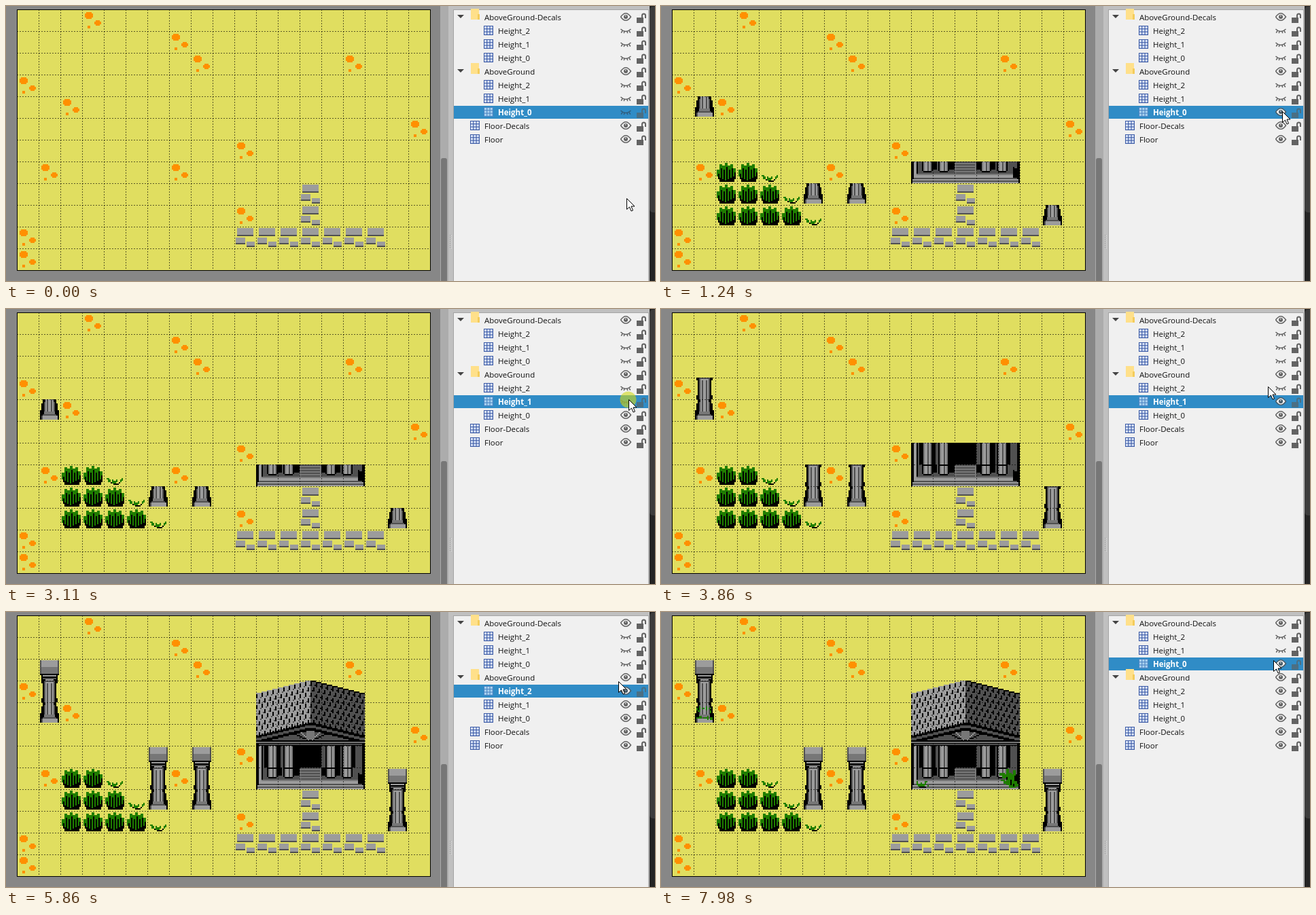
These frames come from a looping animation (955 px wide and 405 px high, 8 s). An HTML page with a canvas:

```html
<!DOCTYPE html>
<html lang="en">
<head>
<meta charset="utf-8">
<title>Layer heights</title>
<style>
html, body { margin: 0; height: 100%; overflow: hidden; background: #878787; }
canvas { display: block; }
</style>
</head>
<body>
<canvas id="stage" width="955" height="405"></canvas>
<script>
const ctx = document.getElementById('stage').getContext('2d');
const LOOP = 8000, STEP = 125;
const K = '#000', D = '#505050', M = '#777', G = '#9c9c9c', LEAF = '#1f7d00';

function box(color, x, y, w, h) {
  ctx.fillStyle = color;
  ctx.fillRect(x, y, w, h);
}

function shape(color, points) {
  ctx.fillStyle = color;
  ctx.beginPath();
  points.forEach(([x, y]) => ctx.lineTo(x, y));
  ctx.closePath();
  ctx.fill();
}

// Art pixels are 2 x 2; the origin is a tile's column and row.
function art(col, row, parts) {
  const ox = 16 + col * 32, oy = 5 + row * 32;
  for (const [c, x, y, w, h] of parts) box(c, ox + x * 2, oy + y * 2, w * 2, h * 2);
}

// ---- map tiles ----
const flowers = [[3,0],[7,1],[8,2],[15,2],[0,3],[2,4],[18,5],[10,6],[1,7],[7,7],[10,9],[0,10],[0,11]];
const paving = [[13,8],[13,9]];
for (let c = 10; c < 17; c++) paving.push([c, 10]);
const pillars = [[1,4],[6,8],[8,8],[17,9]];

const O = '#ff9000';
const flower = [[O,2,3,6,3],[O,3,2,4,5],[O,9,9,5,2],[O,10,8,3,4],[O,4,12,2,2]];
const stone = (x, y, w, h) => [[G, x, y, w, h], [D, x, y + h - 1, w, 1]];
const stones = [...stone(2,1,12,6), ...stone(1,8,7,5), ...stone(9,11,6,4)];

const pillarBase = [
  [K,3,0,10,4],[K,2,3,12,9],[K,1,8,14,7],
  [G,5,0,6,9],[D,4,2,1,8],[D,11,2,1,8],[D,6,0,1,9],[D,9,0,1,9],
  [M,4,9,8,2],[D,3,11,10,1],[G,2,12,12,3],[D,2,12,1,3]
];
const pillarShaft = [
  [K,2,0,12,2],[K,3,2,10,14],[K,2,13,12,3],
  [G,5,1,6,15],[D,4,1,1,15],[D,11,1,1,15],[D,6,2,1,14],[D,9,2,1,14],[D,4,0,8,1]
];
const pillarCap = [
  [D,1,1,14,11],[G,2,1,12,5],[M,2,6,12,5],[K,1,11,14,1],
  [K,2,12,12,4],[G,3,12,10,1],[D,3,14,10,1],[G,5,15,6,1]
];

const bush = [[K,3,12,11,3],[K,2,7,13,6]];
[6,2,3,1,3,2,5].forEach((top, i) => {
  const x = 1 + i * 2, end = 14 - Math.abs(i - 3) * 0.7 | 0;
  bush.push([LEAF, x, top, 2, end - top], [K, x + 1, top + 3, 1, end - top - 3]);
});
const sprout = [
  [LEAF,2,10,2,1],[LEAF,3,11,2,2],[LEAF,6,11,1,3],[LEAF,7,12,2,2],[LEAF,9,11,1,2],
  [LEAF,12,11,1,2],[LEAF,13,10,1,2],[K,5,13,1,1],[K,7,14,4,1],[K,11,13,1,1]
];

const columns = (end) => [8,20,51,63].flatMap(x => [
  [K,x,0,8,end],[M,x + 1,0,6,end],[G,x + 2,0,4,end],[D,x + 4,0,1,end],[K,x + 1,end,6,1]
]);
const porch = [
  [K,0,0,80,16],[G,2,0,2,12],[D,5,0,71,9],[K,16,0,3,6],[K,28,0,4,6],[K,48,0,3,6],[K,59,0,3,6],
  ...columns(7),
  [M,4,9,71,1],[G,4,10,71,2],[D,2,12,76,1],[G,1,13,78,3],[D,1,14,78,1],
  [M,32,1,16,9],...[2,4,6,8].map(y => [D,33,y,14,1]),
  [K,75,4,5,8],[D,76,0,2,5]
];
const hall = [
  [K,0,0,80,16],[G,2,0,2,16],[D,5,0,27,16],[D,48,0,28,16],
  [K,6,0,2,16],[K,16,0,2,16],[K,28,0,4,16],[K,59,0,3,16],[K,71,0,2,16],
  ...columns(16),[K,32,0,16,16],[D,76,0,2,16]
];

const tuft = [
  [LEAF,4,10,1,3],[LEAF,5,12,2,2],[LEAF,7,11,1,3],[LEAF,8,12,2,2],[LEAF,10,10,2,1],
  [LEAF,10,11,1,2],[K,6,14,5,1],[LEAF,12,13,1,1]
];
const moss = [
  [LEAF,2,4,1,2],[LEAF,4,3,1,3],[LEAF,6,4,2,1],[LEAF,9,3,1,3],[LEAF,11,4,2,1],
  [LEAF,3,6,2,1],[LEAF,12,6,1,2],[LEAF,2,11,2,1],[LEAF,4,10,2,2],[LEAF,7,11,3,1],
  [LEAF,10,10,1,3],[LEAF,12,11,2,2]
];
const fern = [
  [LEAF,1,4,4,2],[LEAF,3,5,4,3],[LEAF,6,1,2,5],[LEAF,7,4,3,5],[LEAF,11,2,2,4],[LEAF,10,5,2,4],
  [LEAF,6,8,6,5],[LEAF,2,9,3,1],[LEAF,4,10,3,2],[LEAF,11,10,3,2],[LEAF,13,12,2,2],[LEAF,8,12,5,3],
  [K,6,7,1,2],[K,9,9,1,4],[K,11,12,1,2]
];

function drawRoof() {
  for (let i = 0; i < 80; i++) {
    const x = 368 + i * 2, drop = 2 * Math.floor(Math.abs(i - 39.5) / 4);
    const top = 101 + drop, eave = 165 + drop;
    box(K, x, top, 2, 96 - drop);
    box(i < 40 ? G : D, x, top + (i < 40 ? 0 : 2), 2, i < 40 ? 62 : 60);
    for (let r = 0; r < 8; r++) {
      const tick = (i + r * 2) % 4;
      if (tick === 0) box(K, x, top + 2 + r * 8, 2, 6);
      if (tick === 3) box(i < 40 ? D : K, x, top + 6 + r * 8, 2, 2);
    }
    box(D, x, eave + 2, 2, 4);
    const inner = eave + 10;
    if (inner < 189) {
      box(D, x, inner, 2, 189 - inner);
      // spokes fanning from the middle of the gable
      const dx = Math.abs(i - 39.5);
      for (const slope of [0.45, 0.9, 2]) {
        const y = 189 - Math.round(dx * slope) * 2;
        if (y >= inner && y < 188) box(slope === 0.9 ? G : K, x, y, 2, 2);
      }
      if (dx < 3) box(M, x, inner, 2, 188 - inner);
    }
    box(M, x, 191, 2, 2);
  }
  box(K, 368, 193, 160, 4);
  box(D, 372, 194, 152, 2);
}

function drawMap(on) {
  box('#e0de60', 16, 5, 608, 384);
  flowers.forEach(p => art(...p, flower));
  paving.forEach(p => art(...p, stones));
  if (on[7]) {
    pillars.forEach(p => art(...p, pillarBase));
    for (let r = 0; r < 3; r++) {
      const count = 2 + r;
      for (let c = 0; c < count; c++) art(2 + c, 7 + r, bush);
      art(2 + count, 7 + r, sprout);
    }
    art(11, 7, porch);
  }
  if (on[6]) {
    pillars.forEach(([c, r]) => art(c, r - 1, pillarShaft));
    art(11, 6, hall);
  }
  if (on[5]) {
    pillars.forEach(([c, r]) => art(c, r - 2, pillarCap));
    drawRoof();
  }
  if (on[3]) {
    art(1, 4, moss);
    art(11, 7, tuft);
    art(15, 7, fern);
  }
  ctx.lineWidth = 1;
  ctx.strokeStyle = 'rgba(0,0,0,.6)';
  ctx.setLineDash([2, 2]);
  ctx.beginPath();
  for (let x = 48; x < 624; x += 32) { ctx.moveTo(x + .5, 5); ctx.lineTo(x + .5, 389); }
  for (let y = 37; y < 389; y += 32) { ctx.moveTo(16, y + .5); ctx.lineTo(624, y + .5); }
  ctx.stroke();
  ctx.setLineDash([]);
  ctx.strokeStyle = K;
  ctx.strokeRect(16.5, 5.5, 608, 384);
}

// ---- layer panel ----
const rows = ['AboveGround-Decals', 'Height_2', 'Height_1', 'Height_0',
  'AboveGround', 'Height_2', 'Height_1', 'Height_0', 'Floor-Decals', 'Floor'];

function eye(y, open, color) {
  ctx.strokeStyle = color;
  ctx.lineWidth = 1.5;
  ctx.beginPath();
  if (open) {
    ctx.moveTo(904.5, y);
    ctx.quadraticCurveTo(912, y - 10.5, 919.5, y);
    ctx.quadraticCurveTo(912, y + 10.5, 904.5, y);
    ctx.fillStyle = '#eee';
    ctx.fill();
    ctx.stroke();
    ctx.fillStyle = color;
    ctx.beginPath();
    ctx.arc(912, y, 3, 0, 7);
    ctx.fill();
    box('#ddd', 911, y - 2, 1.5, 1.5);
  } else {
    ctx.moveTo(904.5, y - 2);
    ctx.quadraticCurveTo(912, y + 5, 919.5, y - 2);
    for (const d of [-5, -2, 2, 5]) {
      ctx.moveTo(912 + d, y + 1.5 - Math.abs(d) * .15);
      ctx.lineTo(912 + d * 1.35, y + 4.5 - Math.abs(d) * .2);
    }
    ctx.stroke();
  }
}

function lock(y, color) {
  box(color, 928, y, 10, 8);
  ctx.strokeStyle = color;
  ctx.lineWidth = 2;
  ctx.beginPath();
  ctx.moveTo(936, y + 1);
  ctx.lineTo(936, y - 3);
  ctx.arc(938.5, y - 3, 2.5, Math.PI, 0);
  ctx.lineTo(941, y + 1);
  ctx.stroke();
}

function gridIcon(x, y, chosen) {
  box(chosen ? '#4d86c4' : '#3c5ba6', x, y - 7, 14, 14);
  for (let i = 0; i < 9; i++)
    box(chosen ? '#a9d2ef' : '#dbe5f8', x + 1 + i % 3 * 4.3, y - 6 + Math.floor(i / 3) * 4.3, 3.2, 3.2);
}

function drawPanel(on, chosen) {
  box('#c0c0c0', 639, 0, 308, 405);
  box('#acacac', 639, 0, 12, 405);
  ctx.fillStyle = '#777';
  ctx.beginPath();
  ctx.roundRect(640, 224, 9, 190, 3);
  ctx.fill();
  for (let y = 337; y < 356; y += 3) {
    box('#999', 653, y, 1, 1);
    box('#e4e4e4', 655, y + 1, 1, 1);
  }
  box('#a4a4a4', 658, 5, 288, 400);
  box('#f0f0f0', 659, 6, 286, 399);
  box('#242424', 947, 0, 8, 405);
  ctx.fillStyle = '#3c3c3c';
  ctx.beginPath();
  ctx.roundRect(947, 1, 14, 303, 5);
  ctx.fill();

  rows.forEach((name, i) => {
    const y = 16 + i * 20, group = i === 0 || i === 4, hit = i === chosen;
    const x = group || i > 7 ? 704 : 724;
    if (hit) box('#308cc6', 659, y - 9, 286, 19);
    if (group) {
      shape('#444', [[664, y - 3], [674, y - 3], [669, y + 2]]);
      box('#ffe08a', 684, y - 12, 12, 16);
      box('#f4cc5c', 694, y - 4, 3, 8);
    } else gridIcon(x - 21, y, hit);
    ctx.font = (hit ? 'bold ' : '') + '11.5px "Open Sans", "Noto Sans", sans-serif';
    ctx.fillStyle = hit ? '#fff' : '#111';
    ctx.fillText(name, x, y + 5);
    eye(y, on[i], hit ? (on[i] ? '#465b68' : '#315d7c') : '#636363');
    lock(y + 1, hit ? '#4b6f84' : '#636363');
  });
}

// ---- pointer: first step, last step, destination ----
const moves = [
  [350, 600, 924, 150], [740, 990, 914, 155], [1620, 2120, 891, 138],
  [2490, 2610, 918, 133], [2860, 2860, 916, 133], [3490, 3610, 896, 118],
  [3750, 3860, 893, 114], [4610, 4860, 911, 114], [5740, 6490, 877, 73],
  [6860, 7350, 911, 73], [7480, 7480, 909, 73], [7980, 7980, 901, 71]
];
const presses = [[1110, 1240], [2240, 2370], [3110, 3250], [4240, 4360],
  [5240, 5360], [6610, 6740], [7730, 7860]];

function pointer(t) {
  if (t < 130) return [913, 283];
  if (t < 350) return null;
  let x = 953, y = 160;
  for (const [from, to, nx, ny] of moves) {
    if (t < from) break;
    const n = Math.round((to - from) / STEP) + 1;
    const k = t >= to ? 1 : Math.min(n - 1, Math.floor((t - from + 8) / STEP) + 1) / n;
    x += (nx - x) * k;
    y += (ny - y) * k;
  }
  return [Math.round(x), Math.round(y)];
}

function drawPointer(t) {
  const at = pointer(t);
  if (!at) return;
  const [x, y] = at;
  if (presses.some(([a, b]) => t >= a && t < b)) {
    ctx.fillStyle = 'rgba(208,216,24,.6)';
    ctx.beginPath();
    ctx.arc(x - .5, y + .5, 12, 0, 7);
    ctx.fill();
  }
  shape('#fff', [[0,0],[0,16],[4,12.5],[6.5,18.5],[9,17.5],[6.5,11.5],[11.5,11.5]]
    .map(([dx, dy]) => [x + .5 + dx, y + .5 + dy]));
  ctx.strokeStyle = K;
  ctx.lineWidth = 1;
  ctx.stroke();
}

function draw(now) {
  const t = now % LOOP;
  const on = rows.map((_, i) => i === 0 || i === 4 || i > 7);
  on[7] = t >= 1240;
  on[6] = t >= 3250;
  on[5] = t >= 5360;
  on[3] = t >= 7860;
  const chosen = t < 2240 ? 7 : t < 4240 ? 6 : t < 6610 ? 5 : 3;
  box('#878787', 0, 0, 955, 405);
  drawMap(on);
  drawPanel(on, chosen);
  drawPointer(t);
}

const start = performance.now();
(function frame() {
  draw(performance.now() - start);
  requestAnimationFrame(frame);
})();
</script>
</body>
</html>
```
